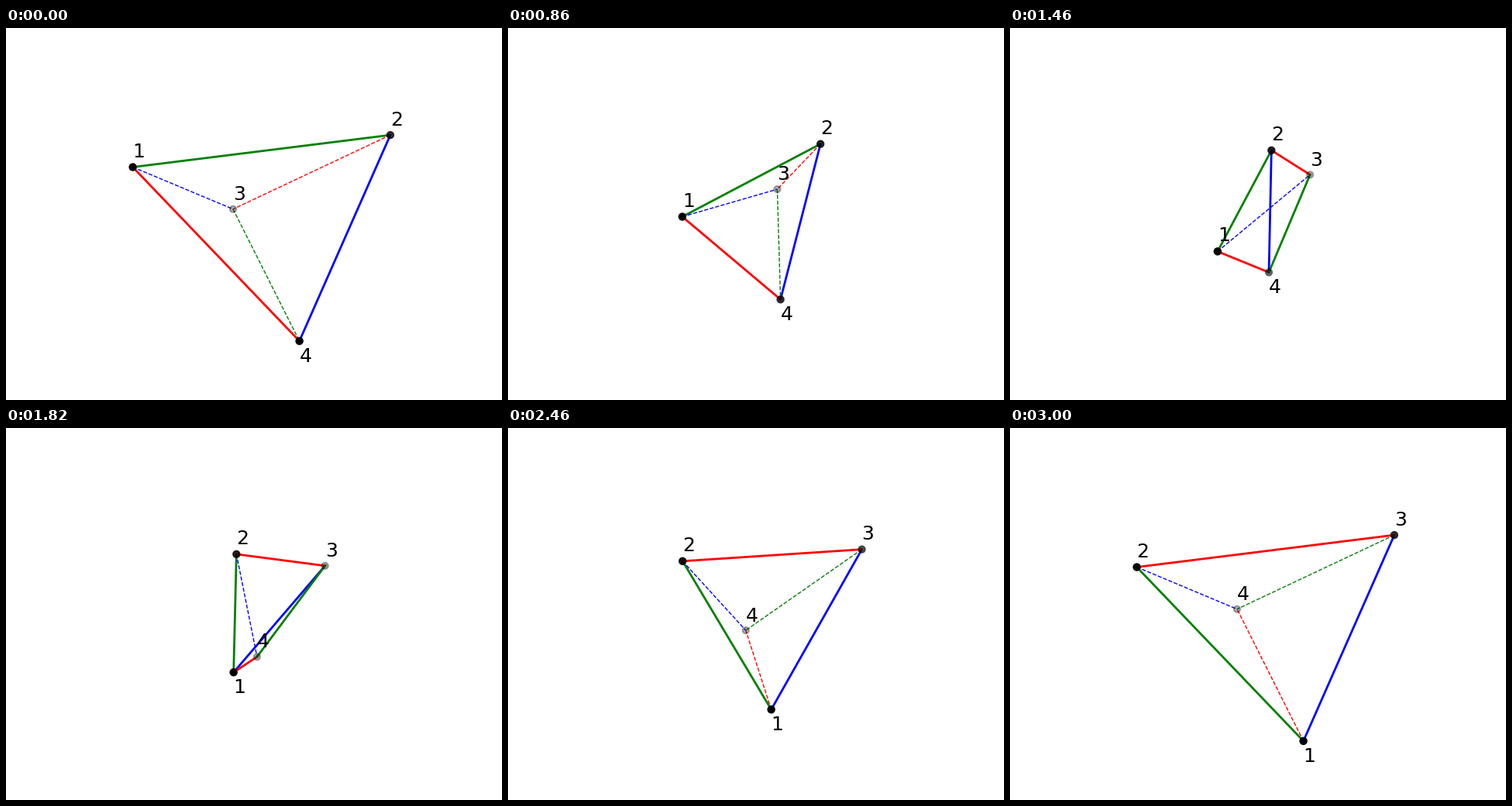
Write a matplotlib script that moves like this. It is 640 by 480 pixels and loops after 4520 ms.

```python
from itertools import combinations

import numpy as np
import matplotlib.pyplot as plt
from matplotlib.animation import FuncAnimation

W, H, DPI = 640, 480, 100
STEP_MS, MOVE, TOTAL = 20, 150, 226
EYE = 5.0  # viewing distance

# Corners of the tetrahedron: screen x, screen y, distance from the eye
corners = np.array([
    [163.6, 179.5, 4.797],
    [495.9, 138.1, 4.983],
    [293.0, 233.7, 5.456],
    [378.6, 403.9, 4.763],
])
# Camera space, eye at the origin
cam = np.column_stack([corners[:, :2] * corners[:, 2:], corners[:, 2]])
goal = np.roll(cam, 1, axis=0)  # each vertex slides to the previous corner

EDGES = list(combinations(range(4), 2))
COLORS = ["green", "blue", "red", "red", "blue", "green"]

fig = plt.figure(figsize=(W / DPI, H / DPI), dpi=DPI, facecolor="white")
ax = fig.add_axes([0, 0, 1, 1])
ax.set_xlim(0, W)
ax.set_ylim(H, 0)
ax.axis("off")

lines = [ax.plot([], [], color=c, zorder=2)[0] for c in COLORS]
dots = ax.scatter(corners[:, 0], corners[:, 1], s=36, linewidths=1.5, zorder=4)
labels = [ax.text(0, 0, str(i + 1), fontsize=18, family="DejaVu Sans",
                  color="black", zorder=3) for i in range(4)]


def faces_eye(p, opposite):
    """True if the face opposite the given vertex is turned to the eye."""
    a, b, c = np.delete(p, opposite, axis=0)
    n = np.cross(b - a, c - a)
    return (n @ -a) * (n @ (p[opposite] - a)) < 0


def depth_alpha(w):
    z = -1 / w
    return 1 - 0.7 * (z - z.min()) / (z.max() - z.min())


def draw(k):
    s = min(k / MOVE, 1)
    p = (1 - s) * cam + s * goal
    w = p[:, 2]
    xy = p[:, :2] / w[:, None]

    # The solid is flat at half way; look just before that moment
    t = s - 1e-6
    q = (1 - t) * cam + t * goal
    front = [faces_eye(q, i) for i in range(4)]

    for line, (i, j) in zip(lines, EDGES):
        line.set_data(xy[[i, j], 0], xy[[i, j], 1])
        seen = any(front[m] for m in range(4) if m not in (i, j))
        line.set_linewidth(2 if seen else 1)
        line.set_linestyle("-" if seen else "--")

    rgba = np.zeros((4, 4))
    rgba[:, 3] = depth_alpha(w)
    dots.set_offsets(xy)
    dots.set_facecolor(rgba)
    dots.set_edgecolor(rgba)

    lowest = np.argmax(xy[:, 1])
    for i, label in enumerate(labels):
        dy = 27 if i == lowest else -12.3 * EYE / w[i]
        label.set_position((xy[i, 0], xy[i, 1] + dy))
    return [*lines, dots, *labels]


anim = FuncAnimation(fig, draw, frames=TOTAL, interval=STEP_MS,
                     init_func=lambda: draw(0), repeat=True, repeat_delay=0)
plt.show()
```
